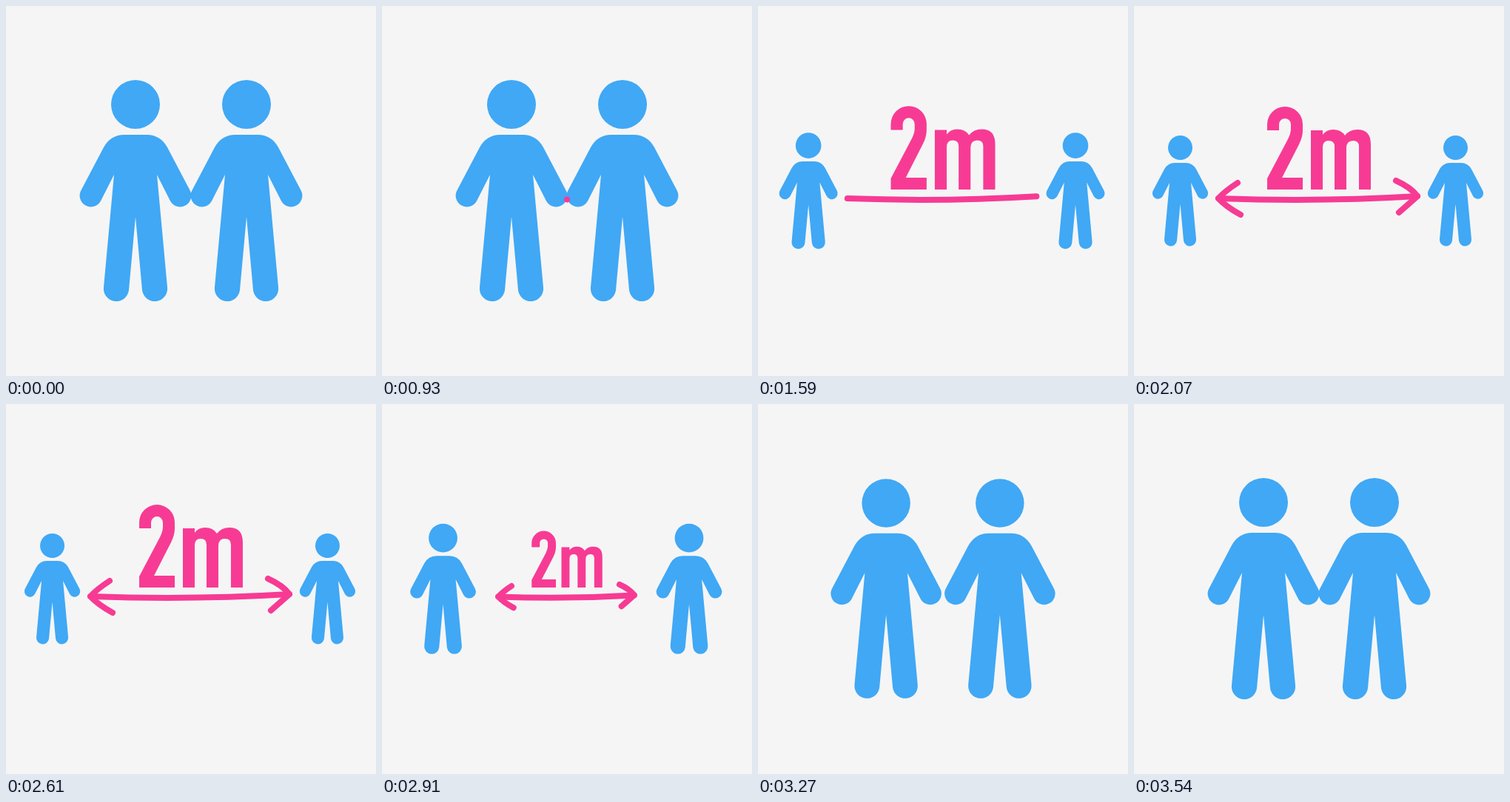
Write an HTML page with a canvas that moves like this. It is 500x500 px and loops after 3.66 s.

```html
<!DOCTYPE html>
<html lang="en">
<head>
<meta charset="utf-8">
<title>Keep 2m apart</title>
<style>
  html, body { margin: 0; width: 100%; height: 100%; overflow: hidden; background: #f5f5f5; }
  canvas { display: block; width: 100%; height: 100%; }
</style>
</head>
<body>
<canvas width="500" height="500" role="img" aria-label="Two people keep 2m apart"></canvas>
<script>
const ctx = document.querySelector('canvas').getContext('2d');
const BLUE = '#40a8f5', PINK = '#f73b94', LOOP = 3660;

// Person around (0, 0); lettering and arrow in stage coordinates.
const person = new Path2D(`M33-117A33 33 0 1 1-33-117A33 33 0 1 1 33-117Z
  M-15-76H15Q33.5-76 43-59L73.5-1A15 15 0 0 1 47 13.5L29-22L43 130A17 17 0 0 1 9 134
  L0 35L-9 134A17 17 0 0 1-43 130L-29-22L-47 13.5A15 15 0 0 1-73.5-1L-43-59Q-33.5-76-15-76Z`);
const lettering = new Path2D(`M180 168V160A24 24 0 0 1 228 160V168Q228 177 223 187L200 232H228V248H180V233
  L208 180Q212 172 212 166V160A8 8 0 0 0 196 160V168Z
  M239 168H255V174Q260 167 269 167Q280 167 285 175Q291 167 302 167Q320 167 320 187V248H304V190
  Q304 182 296 182Q287 182 287 192V248H271V190Q271 182 263 182Q255 182 255 191V248H239Z`);
const shaft = new Path2D('M114 260Q250 265 383 257');
const heads = new Path2D(`M114 260Q123 250 140 239M114 260Q124 271 144 282
  M383 257Q374 245 354 236M383 257Q373 266 358 279`);

const span = (t, start, length) => Math.min(1, Math.max(0, (t - start) / length));
const inOut = (x, n) => x < .5 ? (2 * x) ** n / 2 : 1 - (2 - 2 * x) ** n / 2;

function scaled(path, kx, x, y) {
  const out = new Path2D();
  out.addPath(path, new DOMMatrix([kx, 0, 0, kx, x, y]));
  return out;
}
const around = (path, k, y) => scaled(path, k, 250 * (1 - k), y * (1 - k));

function draw(t) {
  const grow = inOut(span(t, 900, 900), 3);
  const apart = grow - inOut(span(t, 2480, 1060), 5);
  const size = grow - inOut(span(t, 2500, 900), 5);
  const swell = 1 + .06 * (1 - inOut(span(t, 1800, 240), 2));
  const tips = 1 - (1 - span(t, 1600, 380)) ** 2;

  ctx.fillStyle = '#f5f5f5';
  ctx.fillRect(0, 0, 500, 500);

  ctx.fillStyle = BLUE;
  const s = 1 - apart / 2;
  ctx.fill(scaled(person, s, 175 - 112.5 * apart, 250));
  ctx.fill(scaled(person, s, 325 + 109.5 * apart, 250));

  if (t < 920 || t > 3000 && size < .004) return;
  ctx.fillStyle = ctx.strokeStyle = PINK;
  ctx.lineWidth = 8;
  ctx.lineCap = ctx.lineJoin = 'round';
  ctx.fill(around(lettering, size * swell, 248));
  ctx.stroke(around(shaft, size, 261.5));
  if (tips > 0) {
    ctx.setLineDash([42 * tips * size, 999]);
    ctx.stroke(around(heads, size, 261));
    ctx.setLineDash([]);
  }
}

const begin = performance.now();
function tick() {
  draw((performance.now() - begin) % LOOP);
  requestAnimationFrame(tick);
}
tick();
</script>
</body>
</html>
```
